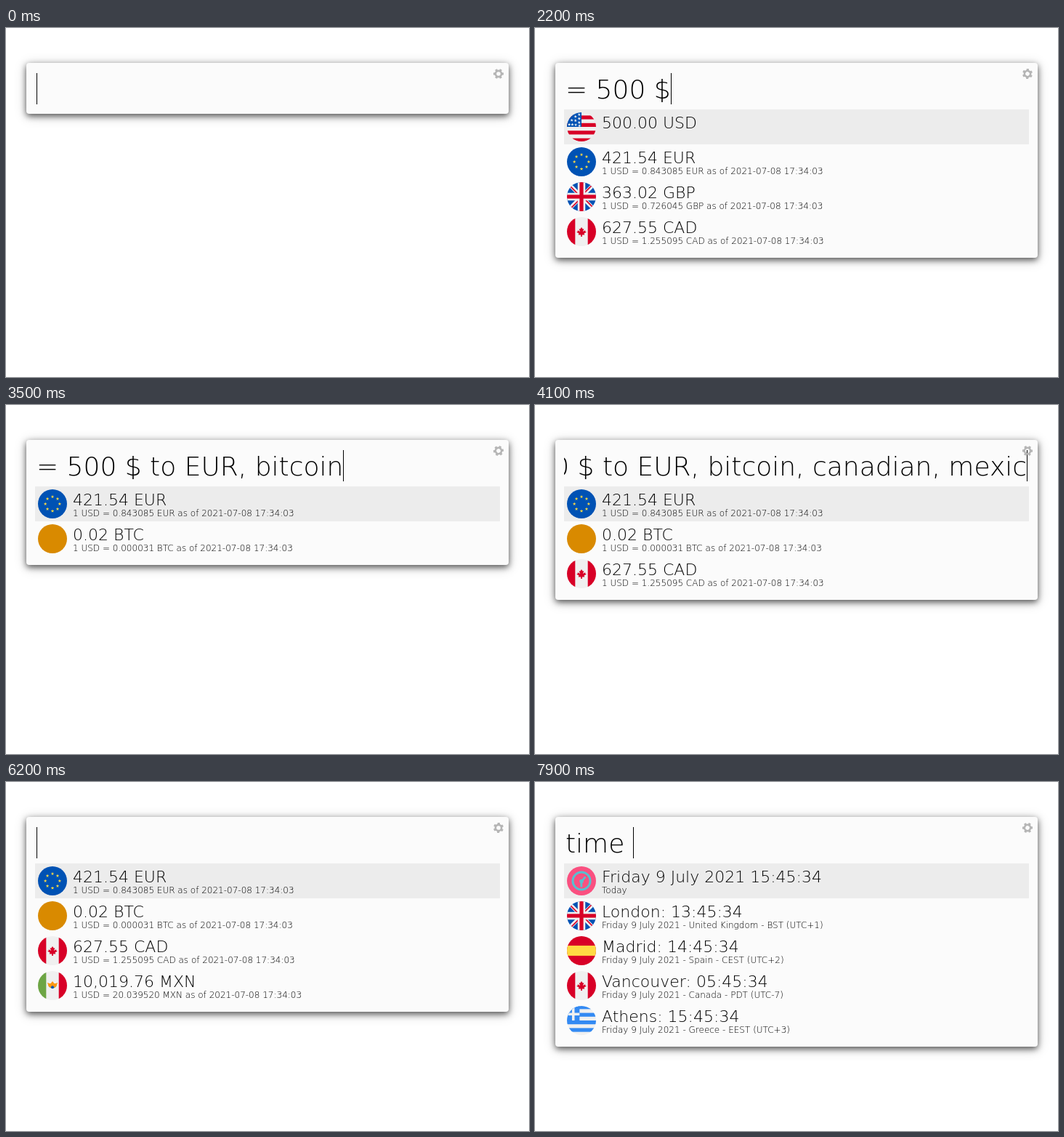
These frames come from a looping animation (720x480 px, 8 s). An HTML page:

```html
<!DOCTYPE html>
<html lang="en">
<head>
<meta charset="utf-8">
<title>Launcher</title>
<style>
  html, body { margin: 0; width: 100%; height: 100%; overflow: hidden; background: #fff; }
  #panel {
    position: absolute; left: 28px; top: 48px; width: 664px;
    border-radius: 4px; background: #fbfbfb;
    box-shadow: 0 3px 9px rgba(0, 0, 0, .62), 0 3px 18px rgba(0, 0, 0, .2);
  }
  svg { position: absolute; left: 0; top: 0; }
  text { font-family: "DejaVu Sans", sans-serif; font-weight: 200; white-space: pre; }
  #query { font-size: 36px; }
  .title { font-size: 22px; }
  .note { font-size: 12px; }
</style>
</head>
<body>
<div id="panel"></div>
<svg width="720" height="480" viewBox="0 0 720 480">
  <defs>
    <clipPath id="disc"><circle cx="256" cy="256" r="256"/></clipPath>
    <clipPath id="field"><rect x="40" y="56" width="640" height="52"/></clipPath>
  </defs>
  <g id="list"></g>
  <g clip-path="url(#field)"><text id="query" y="97"></text></g>
  <rect id="caret" y="62" width="1" height="43"/>
  <g id="gear" fill="none" stroke="#b5b5b5"></g>
</svg>
<script>
const LOOP = 8000, STEP = 100, KEYS_PER_MS = 0.0275;
const RED = '#d80027', BLUE = '#0052b4', WHITE = '#f0f0f0', YELLOW = '#ffda44';
const $ = id => document.getElementById(id);

// Icons are drawn in a 512 unit square and clipped to a disc.
const rect = (x, y, w, h, fill) =>
  `<rect x="${x}" y="${y}" width="${w}" height="${h}" fill="${fill}"/>`;
const fillAll = color => rect(0, 0, 512, 512, color);
const turned = (shape, count) => Array.from({ length: count }, (_, i) =>
  `<g transform="rotate(${i * 360 / count} 256 256)">${shape}</g>`).join('');

function star(cx, cy, r, fill) {
  const points = Array.from({ length: 10 }, (_, i) => {
    const a = i * Math.PI / 5, d = i % 2 ? r * 0.4 : r;
    return `${(cx + d * Math.sin(a)).toFixed(1)},${(cy - d * Math.cos(a)).toFixed(1)}`;
  });
  return `<polygon points="${points.join(' ')}" fill="${fill}"/>`;
}

const sideBands = (left, right) =>
  fillAll(WHITE) + rect(0, 0, 144.7, 512, left) + rect(367.3, 0, 144.7, 512, right);

const halfLeaf = [[0, 178], [22, 211], [45, 211], [22, 256], [67, 234], [67, 256],
  [89, 267], [45, 289], [56, 312], [11, 312], [11, 345]];
const leaf = [...halfLeaf, ...halfLeaf.map(([x, y]) => [-x, y]).reverse()]
  .map(([x, y]) => `${256 + x},${y}`).join(' ');

const icons = {
  us: fillAll(WHITE)
    + [55.7, 189.2, 322.8, 456.3].map(y => rect(0, y, 512, 66.8, RED)).join('')
    + rect(0, 0, 256, 256, BLUE)
    + [[215, 40], [150, 75], [215, 110], [85, 140], [150, 145], [215, 180],
       [40, 215], [95, 215], [155, 220], [220, 235]]
      .map(([x, y]) => star(x, y, 29, WHITE)).join(''),
  eu: fillAll(BLUE) + Array.from({ length: 8 }, (_, i) => {
    const a = i * Math.PI / 4;
    return star(256 + 126 * Math.sin(a), 256 - 126 * Math.cos(a), 31, YELLOW);
  }).join(''),
  gb: fillAll(BLUE)
    + `<path d="M0 0 512 512M512 0 0 512" stroke="${WHITE}" stroke-width="67"/>`
    + rect(0, 189, 512, 134, WHITE) + rect(189, 0, 134, 512, WHITE)
    + turned(`<path d="M323 323 437 437 452 421 354 323z" fill="${RED}"/>`, 4)
    + rect(0, 222.6, 512, 66.8, RED) + rect(222.6, 0, 66.8, 512, RED),
  ca: sideBands(RED, RED) + `<polygon points="${leaf}" fill="${RED}"/>`,
  mx: sideBands('#6da544', RED)
    + '<path d="M178 225a78 78 0 0 0 156 0" fill="#6da544"/>'
    + '<path d="M165 205 220 225 256 180 292 225 347 205 320 275 256 300 192 275z" fill="#ff9811"/>'
    + '<circle cx="256" cy="285" r="25" fill="#0052b4"/>',
  es: fillAll(RED) + rect(0, 167, 512, 178, YELLOW),
  gr: fillAll(WHITE)
    + [-11.1, 122.4, 256, 389.6].map(y => rect(0, y, 512, 66.8, '#338af3')).join('')
    + rect(0, 0, 222, 256, '#338af3')
    + rect(89, 0, 45, 256, WHITE) + rect(0, 122, 222, 45, WHITE),
  coin: fillAll('#d98a00'),
  clock: fillAll('#fa5080')
    + '<g fill="none" stroke="#58bfd0"><circle cx="256" cy="256" r="154" stroke-width="38"/>'
    + '<path d="M254 365V268L325 185" stroke-width="36"/></g>'
    + '<circle cx="256" cy="262" r="35" fill="#58bfd0"/>',
};

const money = (icon, amount, code, rate) => ({
  icon, title: `${amount} ${code}`,
  note: rate ? `1 USD = ${rate} ${code} as of 2021-07-08 17:34:03` : '',
});
const place = (icon, city, time, zone) => ({
  icon, title: `${city}: ${time}:45:34`, note: `Friday 9 July 2021 - ${zone}`,
});
const usd = money('us', '500.00', 'USD');
const eur = money('eu', '421.54', 'EUR', '0.843085');
const gbp = money('gb', '363.02', 'GBP', '0.726045');
const cad = money('ca', '627.55', 'CAD', '1.255095');
const btc = money('coin', '0.02', 'BTC', '0.000031');
const mxn = money('mx', '10,019.76', 'MXN', '20.039520');
const times = [
  { icon: 'clock', title: 'Friday 9 July 2021 15:45:34', note: 'Today' },
  place('gb', 'London', '13', 'United Kingdom - BST (UTC+1)'),
  place('es', 'Madrid', '14', 'Spain - CEST (UTC+2)'),
  place('ca', 'Vancouver', '05', 'Canada - PDT (UTC-7)'),
  place('gr', 'Athens', '15', 'Greece - EEST (UTC+3)'),
];

// Result lists by start time; a loading list briefly shows a scroll handle.
const results = [
  { at: 0, rows: [] },
  { at: 900, rows: [usd], loading: true },
  { at: 1000, rows: [usd, eur, gbp, cad] },
  { at: 3000, rows: [usd], loading: true },
  { at: 3200, rows: [eur] },
  { at: 3500, rows: [eur, btc] },
  { at: 3900, rows: [eur, btc, cad] },
  { at: 4200, rows: [eur, btc, cad, mxn] },
  { at: 6300, rows: [] },
  { at: 6400, rows: times },
];

// Typing bursts: text already there, text typed on, and when the last key falls.
const typing = [
  { at: 0, base: '', add: '', end: 0 },
  { at: 640, base: '', add: '= 500 $', end: 960 },
  { at: 2890, base: '= 500 $', add: ' to EUR, bitcoin, canadian, mexican', end: 4160 },
  { at: 6150, base: '', add: '', end: 6150 },
  { at: 6250, base: '', add: 'time ', end: 6450 },
];

const latest = (list, t) => list.filter(entry => entry.at <= t).pop();

function rowMarkup({ icon, title, note }, i) {
  const y = 112 + 48 * i;
  return `<g transform="translate(44 ${y + 4}) scale(.078125)"><g clip-path="url(#disc)">${icons[icon]}</g></g>`
    + `<text class="title" x="92" y="${y + 26}">${title}</text>`
    + `<text class="note" x="92" y="${y + 41}">${note}</text>`;
}

let shown;
function showResults(result) {
  if (result === shown) return;
  shown = result;
  const { rows, loading } = result;
  $('panel').style.height = (rows.length ? 76 + 48 * rows.length : 70) + 'px';
  $('list').innerHTML =
    (rows.length ? rect(40, 112, loading ? 638 : 640, 48, '#ececec') : '')
    + (loading ? rect(678, 112, 2, 24, '#dedede') : '')
    + rows.map(rowMarkup).join('');
}

function showQuery(t) {
  const { at, base, add, end } = latest(typing, t);
  const query = $('query'), caret = $('caret');
  query.textContent = base + add.slice(0, Math.floor((t - at) * KEYS_PER_MS + 0.001));
  const width = query.textContent ? query.getComputedTextLength() : 0;
  const left = Math.min(42, 677 - width);
  query.setAttribute('x', left);
  caret.setAttribute('x', Math.round(left + width));
  const blinkOn = t < end || (t - end) % 1000 < 500;
  caret.setAttribute('visibility', blinkOn ? 'visible' : 'hidden');
}

$('gear').innerHTML = '<circle r="4.1" stroke-width="2.6"/>'
  + Array.from({ length: 6 }, (_, i) =>
    `<path d="M4.5 0H7" stroke-width="3.2" transform="rotate(${i * 60})"/>`).join('');

const start = performance.now();
function draw() {
  const elapsed = performance.now() - start;
  const t = Math.floor(elapsed / STEP) * STEP % LOOP;
  showResults(latest(results, t));
  showQuery(t);
  $('gear').setAttribute('transform', `translate(678 63) rotate(${t * 0.015})`);
  requestAnimationFrame(draw);
}
draw();
</script>
</body>
</html>
```
